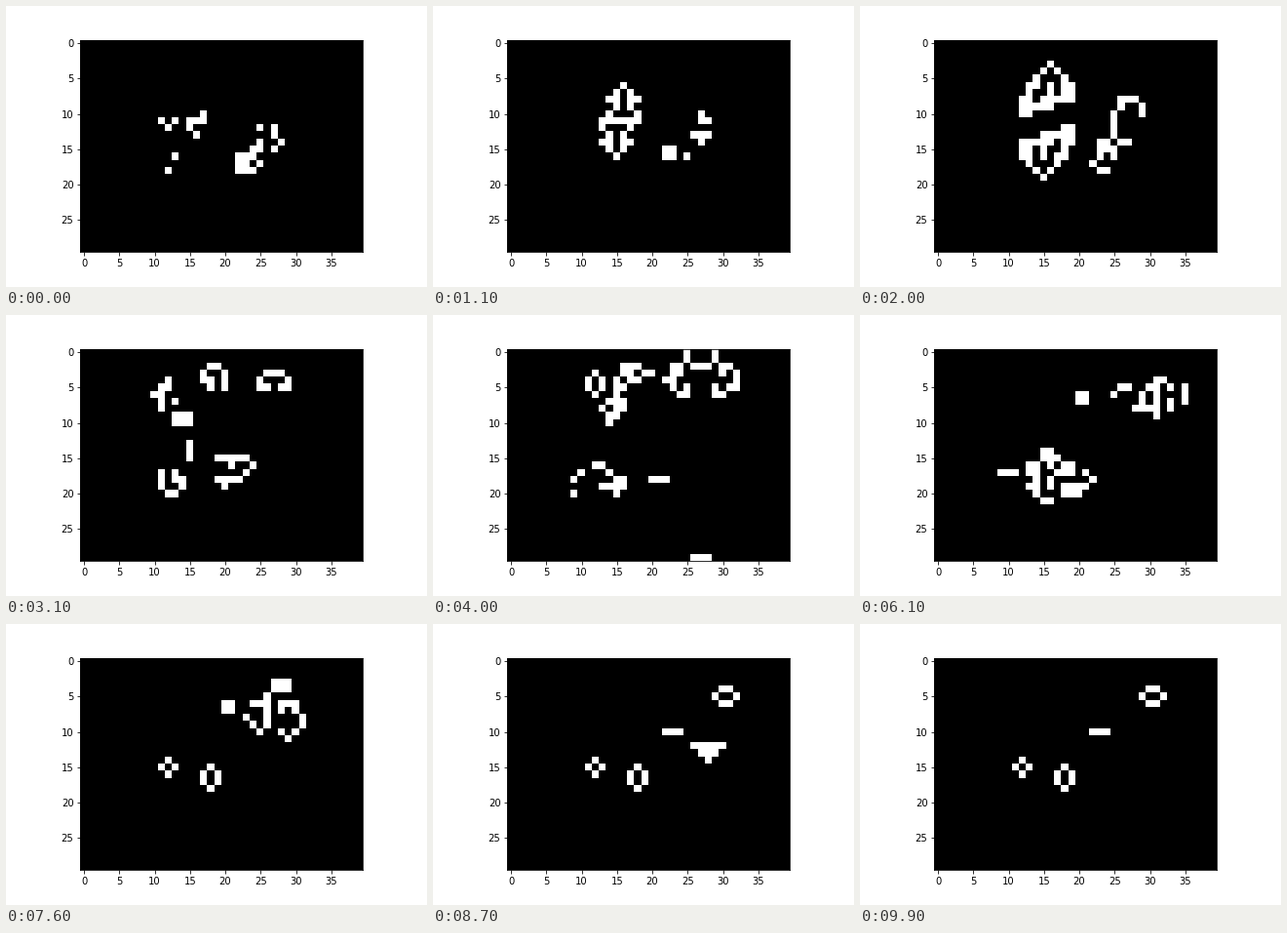
A matplotlib script for the animation above (10 s loop, 432x288 px).

```python
import numpy as np
import matplotlib.pyplot as plt
from matplotlib.animation import FuncAnimation

ROWS, COLS = 30, 40
STEPS, INTERVAL = 100, 100


def start():
    grid = np.zeros((ROWS, COLS), dtype=int)

    # left cluster: a dotted row with short strokes hanging on it
    grid[11, 11:18:2] = 1
    grid[10:12, 17] = 1
    grid[11:13, 15] = 1
    grid[11:14:2, 16] = 1

    # loose dots below it
    grid[12:19:6, 12] = 1
    grid[16, 13] = 1

    # right cluster: a notched square and a broken ring above it
    grid[16:19, 22:25] = 1
    grid[17, 24] = 0
    grid[12:16:3, 25:28:2] = 1
    grid[14:18:3, 25] = 1
    grid[15, 24] = 1
    grid[13, 27] = 1
    grid[14, 28] = 1
    return grid


def step(grid):
    """One Game of Life generation on a torus."""
    near = sum(np.roll(grid, (dy, dx), (0, 1))
               for dy in (-1, 0, 1) for dx in (-1, 0, 1) if dy or dx)
    return ((near == 3) | ((near == 2) & (grid == 1))).astype(int)


history = [start()]
while len(history) < STEPS:
    history.append(step(history[-1]))

fig = plt.figure(figsize=(6, 4), dpi=72, facecolor="white")
fig.subplots_adjust(left=0.125, right=0.9, bottom=0.125, top=0.88)
ax = fig.add_subplot()
image = ax.imshow(history[0], cmap="gray", vmin=0, vmax=1,
                  interpolation="nearest")


def draw(i):
    image.set_data(history[i])
    return [image]


anim = FuncAnimation(fig, draw, frames=STEPS, interval=INTERVAL,
                     repeat=True, repeat_delay=0)
plt.show()
```
